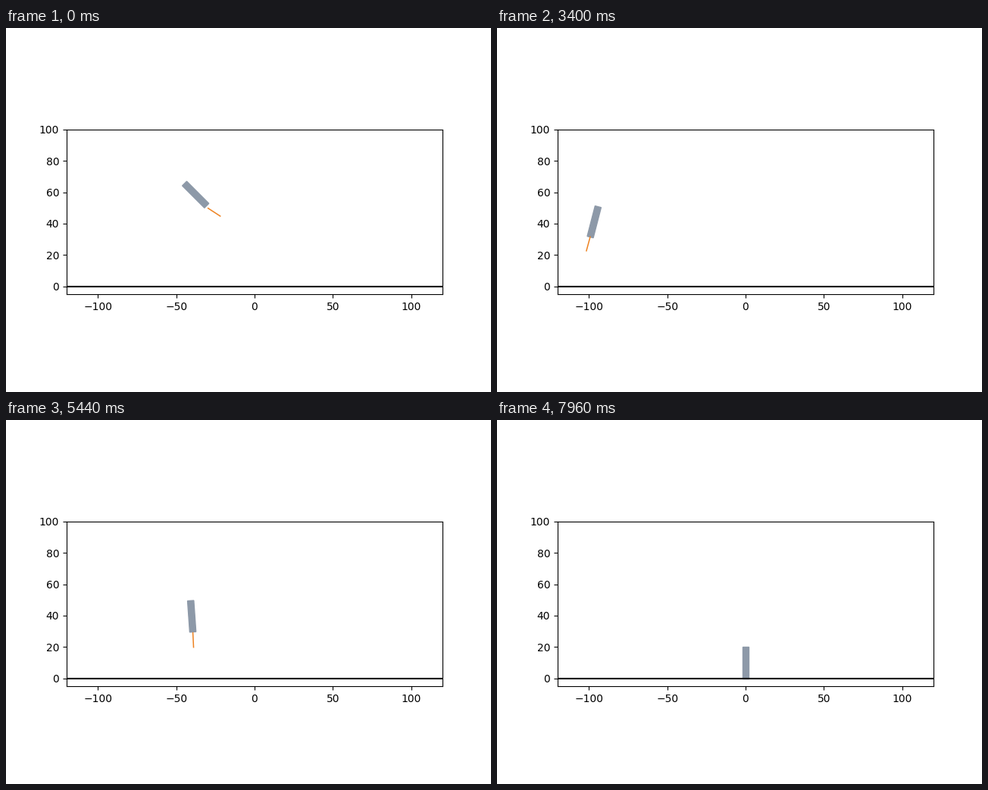
A matplotlib script for the animation above (8000 ms loop, 640 by 480 pixels).

```python
import numpy as np
import matplotlib.pyplot as plt
from matplotlib.animation import FuncAnimation
from matplotlib.patches import Rectangle

FRAMES, INTERVAL = 200, 40
WIDTH, HEIGHT, FLAME = 4, 20, 10
GAIN, MAX_GIMBAL = 65, 12

# Key poses of the flight: step, x, y, tilt in degrees
KEYS = np.array([
    (0, -30, 50, 45),
    (21, -61.9, 56.4, 13),
    (42, -94, 42.8, -23),
    (63, -107.1, 34.2, -19.4),
    (85, -99.1, 31.9, -14.5),
    (116, -65.5, 40.2, -4.1),
    (126, -52.4, 38.9, 0.3),
    (136, -39.4, 29.4, 4),
    (168, -6.2, 5.4, 14.3),
    (199, 0, 0, 0),
])
START_SPEED = np.array([-1.42, 1.3, 0])


def spline(t, p, v0, v1, steps):
    """Smooth path through the poses p at times t with given end speeds."""
    n, h = len(t), np.diff(t)
    d = np.diff(p, axis=0) / h[:, None]
    a, b = np.eye(n), np.zeros_like(p)
    b[0], b[-1] = v0, v1
    for i in range(1, n - 1):
        a[i, i - 1:i + 2] = h[i], 2 * (h[i - 1] + h[i]), h[i - 1]
        b[i] = 3 * (h[i] * d[i - 1] + h[i - 1] * d[i])
    v = np.linalg.solve(a, b)
    i = np.clip(np.searchsorted(t, steps, side="right") - 1, 0, n - 2)
    s, hi = ((steps - t[i]) / h[i])[:, None], h[i][:, None]
    ease = s * s * (3 - 2 * s)
    return (p[i] + (p[i + 1] - p[i]) * ease
            + hi * s * (1 - s) * (v[i] * (1 - s) - v[i + 1] * s))


steps = np.arange(FRAMES)
x, y, tilt = spline(KEYS[:, 0], KEYS[:, 1:], START_SPEED, 0, steps).T

# The engine is off during two coasts and after touchdown
thrust = np.interp(steps, [0, 3, 20, 23, 103, 121, 129, 134],
                   [1, 0, 0, 1, 1, 0, 0, 1])
thrust[-1] = 0

# The nozzle swings against the turn it has to cause
turn = np.gradient(np.gradient(tilt))
turn[:2] = turn[2]
gimbal = np.clip(-GAIN * turn, -MAX_GIMBAL, MAX_GIMBAL)
aim = np.radians(tilt + gimbal)
tip_x = x + FLAME * thrust * np.sin(aim)
tip_y = y - FLAME * thrust * np.cos(aim)

fig, ax = plt.subplots(figsize=(6.4, 4.8), dpi=100)
ax.set_aspect("equal")
ax.set_xlim(-120, 120)
ax.set_ylim(-5, 100)
ax.axhline(0, color="black", lw=1.5)
body = ax.add_patch(Rectangle((0, 0), WIDTH, HEIGHT, color="#8d99a8"))
flame, = ax.plot([], [], color="#ee8322", lw=1.1, solid_capstyle="butt")


def draw(k):
    body.set_xy((x[k] - WIDTH / 2, y[k]))
    body.set_angle(tilt[k])
    flame.set_data([x[k], tip_x[k]], [y[k], tip_y[k]])
    flame.set_visible(bool(thrust[k] > 0))
    return body, flame


anim = FuncAnimation(fig, draw, frames=FRAMES, interval=INTERVAL,
                     init_func=lambda: draw(0), repeat=True, repeat_delay=0)
plt.show()
```
